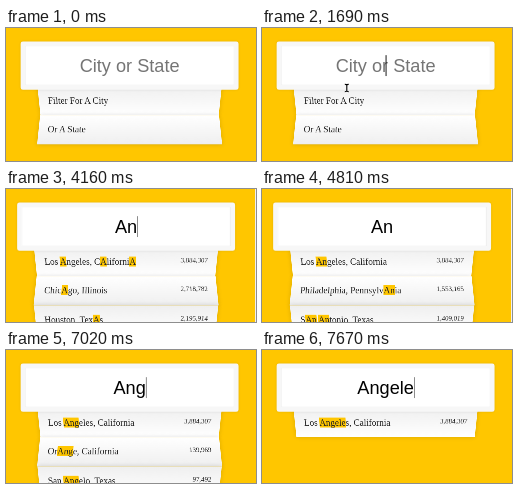
Write an HTML page that moves like this. It is 250 by 133 pixels and loops after 8000 ms.

```html
<!DOCTYPE html>
<html lang="en">
<head>
<meta charset="utf-8">
<title>City search</title>
<style>
  html, body { margin: 0; width: 100%; height: 100%; overflow: hidden; background: #ffc600; }
  #stage { position: relative; width: 250px; height: 133px; overflow: hidden; background: #ffc600; }
  #form {
    position: absolute; top: 8.5px; left: 0; width: 400px;
    transform-origin: 0 0; font: 20px "Liberation Serif", "Times New Roman", serif;
    color: #222;
  }
  #field {
    position: relative; z-index: 2; top: 10px; left: -40px; box-sizing: border-box;
    width: 480px; height: 106px; border: 10px solid #f7f7f7; border-radius: 5px; background: #fff;
    box-shadow: 0 0 5px rgba(0,0,0,.12), inset 0 0 2px rgba(0,0,0,.19);
    font: 40px/86px "Liberation Sans", Arial, sans-serif; text-align: center; white-space: pre;
  }
  #text { position: relative; color: #000; }
  #text.hint { color: #757575; }
  #caret { position: absolute; top: 20px; width: 1.6px; height: 46px; background: #000; }
  ul { margin: 0; padding: 0; list-style: none; }
  li {
    position: relative; box-sizing: border-box; height: 64px; padding: 20px; line-height: 23px;
    display: flex; justify-content: space-between; white-space: nowrap;
    border-bottom: 1px solid #d8d8d8; box-shadow: 0 0 10px rgba(0,0,0,.14);
  }
  li:nth-child(odd) {
    transform: perspective(100px) rotateX(-3deg) translateY(3px);
    background: linear-gradient(to top, #fff, #efefef);
  }
  li:nth-child(even) {
    transform: perspective(100px) rotateX(3deg) translateY(2px) scale(1.001);
    background: linear-gradient(to bottom, #fff, #efefef);
  }
  .count { font-size: 15px; line-height: 17px; }
  .hl { background: #ffc600; }
  #bar { position: absolute; top: 0; left: 249px; width: 8px; height: 133px; background: #f0f0f0; }
  #mouse { position: absolute; left: 0; top: 0; overflow: visible; }
</style>
</head>
<body>
<div id="stage">
  <div id="form">
    <div id="field"><span id="text"></span><i id="caret"></i></div>
    <ul id="list"></ul>
  </div>
  <div id="bar"></div>
  <svg id="mouse" width="1" height="1">
    <path d="M-2-3.7Q0-3.7 0-2.8Q0-3.7 2-3.7M0-2.8V2.8M-2 3.7Q0 3.7 0 2.8Q0 3.7 2 3.7" fill="none" stroke="#000" stroke-width="1.1"/>
  </svg>
</div>
<script>
const LOOP = 8000, STEP = 130, SCALE = 0.454;
const CENTER = 123.6, SCROLLED_CENTER = 120.1;
const $ = id => document.getElementById(id);

const la = ["Los Angeles, California", "3,884,307"];
const orange = ["Orange, California", "139,969"];
const angelo = ["San Angelo, Texas", "97,492"];
const results = {
  "": [["Filter For A City", ""], ["Or A State", ""]],
  A: [la, ["Chicago, Illinois", "2,718,782"], ["Houston, Texas", "2,195,914"]],
  An: [la, ["Philadelphia, Pennsylvania", "1,553,165"], ["San Antonio, Texas", "1,409,019"]],
  Ang: [la, orange, angelo],
  Ange: [la, orange, angelo],
  Angel: [la, angelo],
  Angele: [la]
};

// [start time, value]
const typed = [[0, ""], [2340, "A"], [4160, "An"], [5980, "Ang"], [7280, "Ange"], [7540, "Angel"], [7670, "Angele"]];
const queries = [[0, ""], [2470, "A"], [4290, "An"], [5980, "Ang"], [7410, "Ange"], [7540, "Angel"], [7670, "Angele"]];
// The caret toggles at each of these times, starting hidden
const blinks = [650, 1170, 1690, 2210, 2340, 2860, 3380, 3900, 4160, 4810, 5330, 5850, 5980, 6500, 7020];

const at = (track, t) => track.filter(k => k[0] <= t).pop()[1];

let shownQuery = null, shownText = null;

function showList(query) {
  if (query === shownQuery) return;
  shownQuery = query;
  const mark = s => query
    ? s.replace(new RegExp(query, "gi"), `<span class="hl">${query}</span>`) : s;
  $("list").innerHTML = results[query]
    .map(([name, count]) => `<li><span>${mark(name)}</span><span class="count">${count}</span></li>`)
    .join("");
  const scrolls = query === "A" || query === "An";
  const center = scrolls ? SCROLLED_CENTER : CENTER;
  $("form").style.transform = `translateX(${center - 200 * SCALE}px) scale(${SCALE})`;
  $("bar").style.display = scrolls ? "" : "none";
}

function showText(value) {
  if (value === shownText) return;
  shownText = value;
  const text = $("text");
  text.textContent = value || "City or State";
  text.className = value ? "" : "hint";
  $("caret").style.left = 230 + (value ? text.offsetWidth / 2 : 0) + "px";
}

function showMouse(t) {
  const p = Math.min(1, Math.floor(t / STEP) * STEP / 910);
  const left = (1 - p) ** 2;
  const mouse = $("mouse");
  mouse.style.display = t >= STEP && t < 2860 ? "" : "none";
  mouse.style.transform = `translate(${84.8 + 27 * left}px, ${60 + 44 * left}px)`;
}

function draw(t) {
  showList(at(queries, t));
  showText(at(typed, t));
  showMouse(t);
  const on = blinks.filter(b => b <= t).length % 2;
  $("caret").style.display = on ? "" : "none";
}

const start = performance.now();
function tick() {
  draw((performance.now() - start) % LOOP);
  requestAnimationFrame(tick);
}
tick();
</script>
</body>
</html>
```
